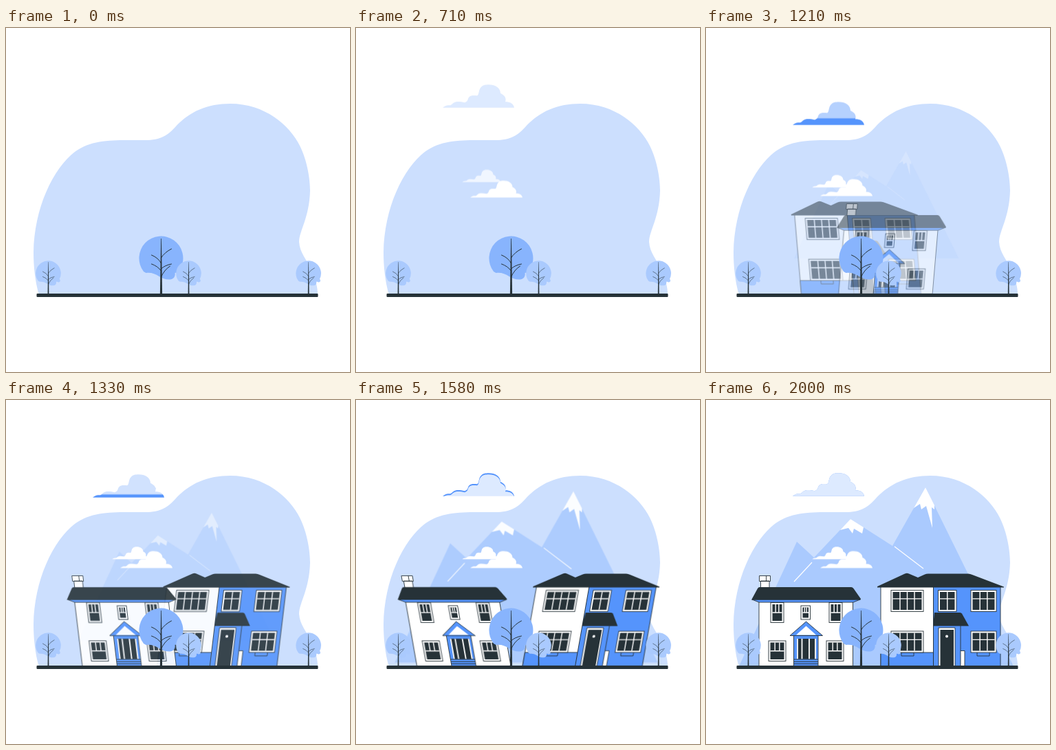
These frames come from a looping animation (500x500 px, 2040 ms). An HTML page:

```html
<!DOCTYPE html>
<html lang="en">
<head>
<meta charset="utf-8">
<title>Two houses</title>
<style>
  html, body { margin: 0; width: 100%; height: 100%; overflow: hidden; background: #fff; }
  svg { display: block; width: 100vw; height: 100vh; }

  .dark { fill: #263238; }
  .blue { fill: #5594fc; }
  .line { stroke: #263238; stroke-width: .9; }
  .white { fill: #fff; }

  .anim { animation: 2040ms cubic-bezier(.36, -.01, .5, 1.38) infinite; }
  #sky { animation: gate 2040ms step-end infinite; }
  #pair, #cloudA { animation-name: slide0; }
  #cloudB { animation-name: slide1; }
  #cloudC { animation-name: slide2; }
  #cloudD { animation-name: slide3; }
  #hills { animation-name: zoom; transform-origin: 248px 257px; }
  #left { animation-name: fromRight; transform-origin: 145.5px 321px; }
  #right { animation-name: fromLeft; transform-origin: 341px 319px; }

  @keyframes gate {
    0% { visibility: hidden; }
    20.58%, 100% { visibility: visible; }
  }
  @keyframes slide0 {
    0% { opacity: 0; transform: translateY(-30px); }
    47.79%, 100% { opacity: 1; transform: translateY(0); }
  }
  @keyframes slide1 {
    0%, 11.03% { opacity: 0; transform: translateY(-30px); }
    60.05%, 100% { opacity: 1; transform: translateY(0); }
  }
  @keyframes slide2 {
    0%, 23.28% { opacity: 0; transform: translateY(-30px); }
    72.3%, 100% { opacity: 1; transform: translateY(0); }
  }
  @keyframes slide3 {
    0%, 35.54% { opacity: 0; transform: translateY(-30px); }
    84.56%, 100% { opacity: 1; transform: translateY(0); }
  }
  @keyframes zoom {
    0%, 47.89% { opacity: 0; transform: scale(.5); }
    96.91%, 100% { opacity: 1; transform: scale(1); }
  }
  @keyframes fromRight {
    0%, 47.89% { opacity: 0; transform: translate3d(250px, 0, 0) skewX(-20deg); }
    77.3% { opacity: 1; transform: skewX(10deg); }
    87.1% { opacity: 1; transform: skewX(-2deg); }
    96.91%, 100% { opacity: 1; transform: translate3d(0, 0, 0); }
  }
  @keyframes fromLeft {
    0%, 47.89% { opacity: 0; transform: translate3d(-250px, 0, 0) skewX(20deg); }
    77.3% { opacity: 1; transform: skewX(-10deg); }
    87.1% { opacity: 1; transform: skewX(2deg); }
    96.91%, 100% { opacity: 1; transform: translate3d(0, 0, 0); }
  }
</style>
</head>
<body>
<svg viewBox="0 0 500 500">
  <defs>
    <!-- origin: bottom left corner -->
    <path id="cloud" d="M0 0C3-2 5-3.500 8-3.500C11-3 13-4 15-6.500C19-9.500 25-9 32-7.500C37-9 36-12 38-15C41-18.500 46-17.500 50-17.500C53-19 52-25 55-29C58-33 62-33.500 67-33.500C76-33.500 84-29 84-21C90-18 93-14 91-8.500C98-8.500 103-6 104 0Z"/>
    <!-- origin: foot of the trunk -->
    <path id="crown" d="M-25.500-32A32 32 0 1 1 28.500-37C32-33 30-28 25-29C23-29 22-31 20-30C21-25 18-21 13-20.500C7-20 2-22 -3-25C-9-29-15-31-22-30Z"/>
    <g id="trunk">
      <path class="dark" d="M-.3-80L.4-80L1.600 0H-1.600Z"/>
      <path fill="none" stroke="#263238" stroke-width="1" stroke-linecap="round"
        d="M0-44Q-4-52-14-56M0-52Q5-60 15-65M0-33Q-5-40-14-43M0-36Q5-41 15-43M0-24Q4-34 13-40"/>
    </g>
  </defs>

  <path fill="#ccdffe" d="M48 388C42 368 40 345 40 326C41 262 68 205 100 180C122 164 148 163 176 163L198 163C224 164 235 156 246 144C267 121 293 110 326 110C376 110 412 141 427 171C438 193 442 220 442 236C441 276 426 295 426 311C427 327 437 336 444 352C450 366 453 376 453 388Z"/>

  <g id="hills" class="anim">
    <path fill="#aacafe" d="M48 387L132 206L157 229L210 173L271 212L319 127L447 387Z"/>
    <path class="white" d="M319 127L332 153V159L328 156L329 186L320 154L313 159L311 151L302 157ZM210 173L229 185L227 194L215 187L213 194L207 186L195 189Z"/>
    <path fill="none" stroke="#fff" stroke-width="1.200" d="M128 264L154 236M274 213L316 245"/>
  </g>

  <g id="sky">
    <g id="pair" class="anim white">
      <g id="cloudB" class="anim"><use href="#cloud" transform="translate(154 231.500) scale(.54)"/></g>
      <g id="cloudA" class="anim"><use href="#cloud" transform="translate(166 244.300) scale(.731)"/></g>
    </g>
  </g>
  <g id="cloudC" class="anim blue"><use href="#cloud" x="126" y="139.700"/></g>
  <g id="cloudD" class="anim white"><use href="#cloud" x="126" y="139.700" fill-opacity=".8"/></g>

  <g id="right" class="anim">
    <path class="white line" d="M254 271H330.500V386.500H254Z"/>
    <path class="blue line" d="M254 367H330.500V386.500H254ZM330.500 271H428V386.500H330.500Z"/>
    <path class="dark" d="M249 272.500V271L289 252.500Q292 251 295 252.500L308 258L318 253.500Q320 252.500 323 252.500H381Q384 252.500 387 254L433 271.500V272.500Z"/>
    <path class="white line" d="M338 331H362V386.500H338Z"/>
    <path class="dark" d="M340.500 334H360V386H340.500Z"/>
    <circle class="white" cx="350" cy="343.500" r="2"/>
    <path class="white line" d="M370 328V364.500H376V386.500H370V364.500"/>
    <path class="dark" d="M332 309H369Q371 309 372 310.500L382 328.500H330Z"/>
    <path fill="none" class="line" d="M284 367V372H302V367M394 367V372H412V367"/>
  </g>

  <g id="left" class="anim">
    <path class="white line" d="M79.500 263H92V275H79.500ZM77.500 255.500H93.500V263.500H77.500ZM87.500 255.500V263.500"/>
    <path class="white line" d="M77 292H213.500V386.500H77Z"/>
    <path class="blue line" d="M67 290H224L214 294H77Z"/>
    <path class="dark" d="M66 290.500L75 274Q76 272 78 272H211Q213 272 214.500 274L225 289Q225 290.500 224 290.500Z"/>
    <path class="blue line" d="M127.500 342H163V386.500H127.500Z"/>
    <path class="dark" d="M132 347H160V376.500H132Z"/>
    <path stroke="#fff" stroke-width="1.800" d="M133 347V376.500M139.500 347V376.500M150 347V376.500M159 347V376.500"/>
    <path class="line" d="M127.500 377H163M127.500 380.500H163M127.500 383.500H163"/>
    <path class="blue line" d="M122 342.500L145.500 322L169.500 342.500Z"/>
    <path class="white" d="M131 341.500L145.500 328.500L160 341.500Z"/>
  </g>

  <rect class="dark" x="44.500" y="386" width="409" height="5" rx="1"/>

  <g transform="translate(225.500 386)"><use href="#crown" fill="#88b4fd"/><use href="#trunk"/></g>
  <g id="grove"></g>
</svg>
<script>
  const NS = 'http://www.w3.org/2000/svg';
  const $ = id => document.getElementById(id);

  function add(parent, tag, attrs) {
    const el = document.createElementNS(NS, tag);
    for (const k in attrs) el.setAttribute(k, attrs[k]);
    return parent.appendChild(el);
  }

  // Framed window: upright bars reach down to `reach` of the glass, one crossbar at `cross`
  function pane(house, x, y, w, h, cols, cross, reach) {
    const pad = 2.5, iw = w - 2 * pad, ih = h - 2 * pad;
    const x0 = x + pad, y0 = y + pad;
    add(house, 'rect', { x, y, width: w, height: h, class: 'white line' });
    add(house, 'rect', { x: x0, y: y0, width: iw, height: ih, class: 'dark' });
    let d = `M${x0} ${y0 + ih * cross}h${iw}`;
    for (let i = 1; i < cols; i++) d += `M${x0 + iw * i / cols} ${y0}v${ih * reach}`;
    add(house, 'path', { d, stroke: '#fff', 'stroke-width': 1.4 });
  }

  const left = $('left'), right = $('right');
  for (const [x, y, w, h] of [[94, 294.5, 19, 29], [138, 299, 13.5, 20], [179, 294.5, 19, 29],
    [91, 350, 25, 29.5], [175, 350, 25, 29.5]]) pane(left, x, y, w, h, 3, .5, .5);

  for (const y of [276.5, 336]) {
    pane(right, 269, y, 47, 31, 4, .38, 1);
    pane(right, 385, y, 37, 31, 3, .38, 1);
  }
  pane(right, 337.5, 276.5, 26.5, 31, 2, .38, 1);

  for (const x of [61.5, 265.5, 439.7]) {
    const tree = add($('grove'), 'g', { transform: `translate(${x} 386) scale(.571)` });
    add(tree, 'use', { href: '#crown', fill: '#aacafe' });
    add(tree, 'use', { href: '#trunk' });
  }
</script>
</body>
</html>
```
